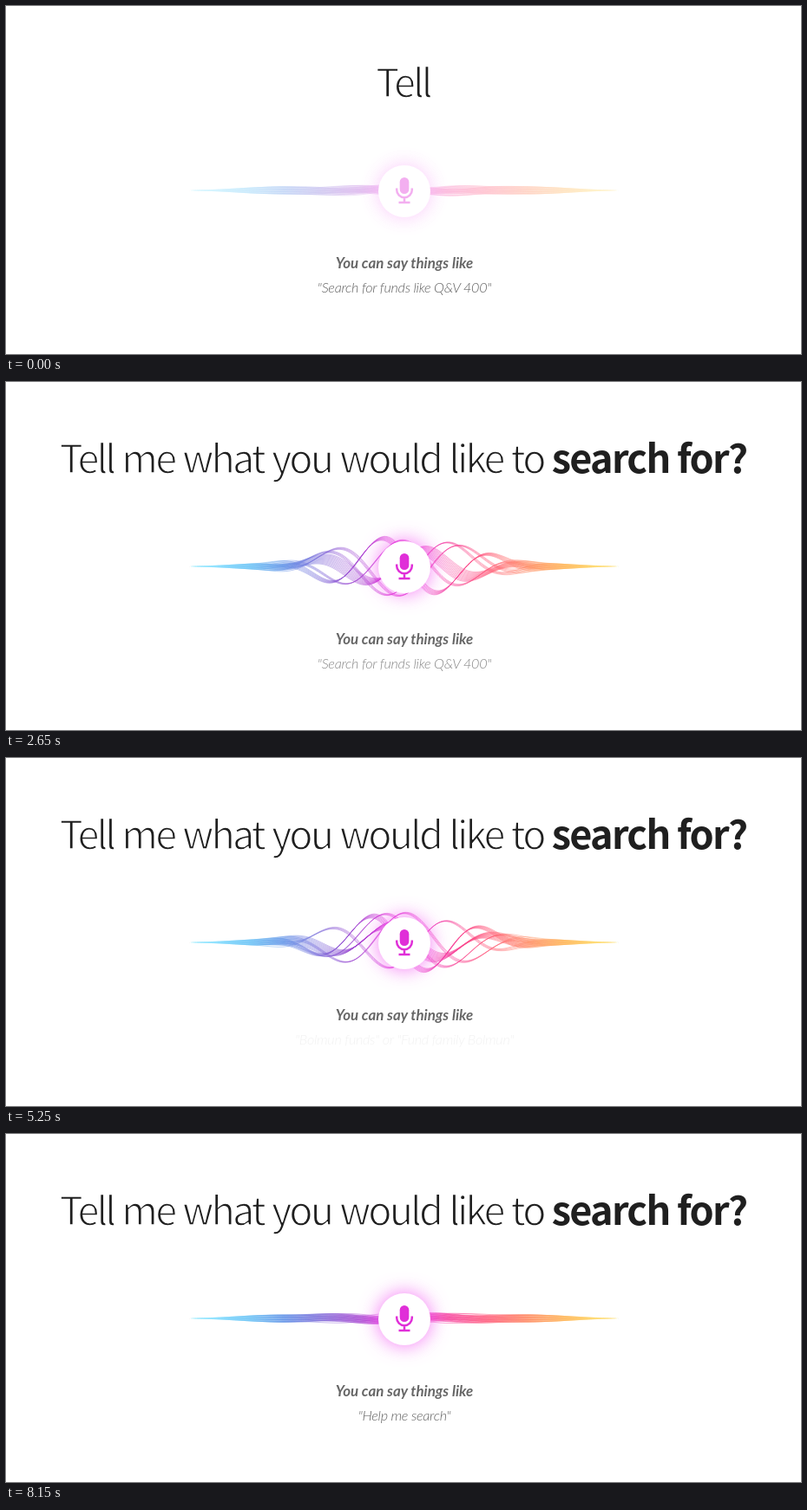
Recreate the animation shown at these times as an HTML page with a canvas. Size 916 px wide and 402 px high, loop 8200 ms.

```html
<!DOCTYPE html>
<html lang="en">
<head>
<meta charset="utf-8">
<title>Voice search</title>
<style>
  html, body { margin: 0; width: 100%; height: 100%; overflow: hidden; background: #fff; }
  canvas, svg { position: absolute; left: 0; top: 0; width: 916px; height: 402px; }
  text { text-anchor: middle; }
  #headline {
    font: 400 45px "Noto Sans CJK JP", "Noto Sans CJK SC", "Noto Sans CJK", sans-serif;
    fill: #1f1f1f;
  }
  /* The white outline thins the regular weight to a light one. */
  #light { letter-spacing: -2.9px; word-spacing: 2px; stroke: #fff; stroke-width: 1.4px; }
  #strong { font-weight: 700; letter-spacing: -1.7px; }
  #label { font: italic 700 16.9px Lato, sans-serif; fill: #666; }
  #hint { font: italic 300 16.2px Lato, sans-serif; letter-spacing: -.3px; fill: #606060; }
</style>
</head>
<body>
<canvas id="wave" width="916" height="402"></canvas>
<svg viewBox="0 0 916 402">
  <text id="headline" x="457.5" y="104.5"><tspan id="light"></tspan><tspan id="strong"></tspan></text>
  <text id="label" x="459" y="303">You can say things like</text>
  <text id="hint" x="459" y="331"></text>
</svg>
<script>
const LOOP = 8200;
const CX = 459, CY = 213, LEFT = 211, RIGHT = 706, REACH = 187;
const $ = id => document.getElementById(id);
const canvas = $('wave');
const ctx = canvas.getContext('2d');

const WORDS = 'Tell me what you would like to search for?'.split(' ');
const LIGHT_WORDS = 7, WORD_TIME = 160;

const HINTS = [
  '"Search for funds like Q&V 400"',
  '"Bolmun funds" or "Fund family Bolmun"',
  '"Show me Bond categories"',
  '"Help me search"'
];
const HINT_START = 2520, HINT_PERIOD = 2405, FADE = 400;

// [time, value] steps, eased in between
const SWELL = [[0, .1], [1750, .1], [2250, 1], [5300, 1], [5900, .1],
               [7050, .1], [7350, .6], [7700, .2], [8000, .1]];
const OPACITY = [[0, .38], [1750, .38], [2150, 1]];

// crest: offset from the centre at 3400 ms; speed in px/s; spread: phase width of the ribbon
const RIBBONS = [
  { length: 123, crest: 61,  speed: -110, height: 20, width: 9,   spread: .6, strands: 13 },
  { length: 130, crest: -12, speed: -155, height: 34, width: 4,   spread: .2, strands: 7 },
  { length: 150, crest: 49,  speed: -26,  height: 34, width: 1.5, spread: .1, strands: 4 },
  { length: 150, crest: -75, speed: 28,   height: 34, width: 1.5, spread: .1, strands: 4 },
  { length: 140, crest: -87, speed: 75,   height: 30, width: 1.5, spread: .1, strands: 4 }
];
const CALM_WIDTH = 8;

const swing = p => .5 - Math.cos(Math.PI * p) / 2;
const clamp = v => Math.max(0, Math.min(1, v));
const mix = (a, b, p) => a + (b - a) * p;

function valueAt(steps, t) {
  const i = steps.findIndex(s => s[0] > t);
  if (i < 0) return steps[steps.length - 1][1];
  const [t0, a] = steps[i - 1], [t1, b] = steps[i];
  return mix(a, b, swing((t - t0) / (t1 - t0)));
}

const rainbow = ctx.createLinearGradient(LEFT, 0, RIGHT, 0);
[
  [0, '#a8ecff00'], [.06, '#8fe2ff90'], [.14, '#62c0f5c0'], [.22, '#5a8ee6'],
  [.32, '#8262d6'], [.4, '#a63fd0'], [.46, '#da30d4'], [.54, '#e838c8'],
  [.6, '#f53a9c'], [.69, '#ff5478'], [.79, '#ff8458'], [.87, '#ffb04ec0'],
  [.94, '#ffd97090'], [1, '#ffe9a000']
].forEach(([at, color]) => rainbow.addColorStop(at, color));

function drawRibbon(r, t, swell) {
  const crest = r.crest + r.speed * (t - 3400) / 1000;
  const k = 2 * Math.PI / r.length;
  for (let j = 0; j < r.strands; j++) {
    const q = j / (r.strands - 1) - .5;
    ctx.beginPath();
    for (let x = LEFT; x <= RIGHT; x += 3) {
      const d = x - CX;
      const taper = swing(clamp((248 - Math.abs(d)) / 110));
      const rise = swell * Math.max(0, 1 - (d / REACH) ** 2) ** 2.6;
      const width = taper * mix(CALM_WIDTH, r.width, clamp(rise * 3));
      ctx.lineTo(x, CY + q * width - rise * r.height * Math.cos(k * (d - crest) + q * r.spread));
    }
    ctx.stroke();
  }
}

function drawMic() {
  ctx.save();
  ctx.shadowColor = 'rgba(240, 70, 240, .75)';
  ctx.shadowBlur = 22;
  ctx.fillStyle = '#fff';
  ctx.beginPath();
  ctx.arc(CX, 214, 30, 0, 2 * Math.PI);
  ctx.fill();
  ctx.restore();

  ctx.fillStyle = ctx.strokeStyle = '#e02fd8';
  ctx.beginPath();
  ctx.roundRect(CX - 5.3, 198, 10.6, 19, 5.3);
  ctx.fill();
  ctx.lineWidth = 2.5;
  ctx.beginPath();
  ctx.moveTo(CX + 8.8, 210.5);
  ctx.arc(CX, 212.5, 8.8, 0, Math.PI);
  ctx.lineTo(CX - 8.8, 210.5);
  ctx.moveTo(CX, 221);
  ctx.lineTo(CX, 227);
  ctx.moveTo(CX - 6.5, 227);
  ctx.lineTo(CX + 6.5, 227);
  ctx.stroke();
}

function drawWave(t) {
  ctx.clearRect(0, 0, 916, 402);
  canvas.style.opacity = valueAt(OPACITY, t);
  const swell = valueAt(SWELL, t);
  ctx.strokeStyle = rainbow;
  ctx.lineWidth = 1;
  ctx.globalAlpha = .42;
  RIBBONS.forEach(r => drawRibbon(r, t, swell));
  ctx.globalAlpha = 1;
  drawMic();
}

function setText(el, text) {
  if (el.textContent !== text) el.textContent = text;
}

function showHeadline(t) {
  const shown = WORDS.slice(0, 1 + Math.floor(t / WORD_TIME));
  const strong = shown.slice(LIGHT_WORDS).join(' ');
  setText($('light'), shown.slice(0, LIGHT_WORDS).join(' ') + (strong && '\u00a0'));
  setText($('strong'), strong);
}

function showHint(t) {
  const since = t - HINT_START;
  const turn = Math.max(-1, Math.floor(since / HINT_PERIOD));
  const p = (since - turn * HINT_PERIOD) / FADE;
  const leaving = turn >= 0 && p < 1;
  setText($('hint'), HINTS[leaving ? turn : turn + 1]);
  $('hint').style.opacity = turn < 0 ? 1 : leaving ? 1 - swing(p) : swing(clamp(p - 1));
}

const start = performance.now();
function frame() {
  const t = (performance.now() - start) % LOOP;
  showHeadline(t);
  showHint(t);
  drawWave(t);
  requestAnimationFrame(frame);
}
frame();
</script>
</body>
</html>
```
